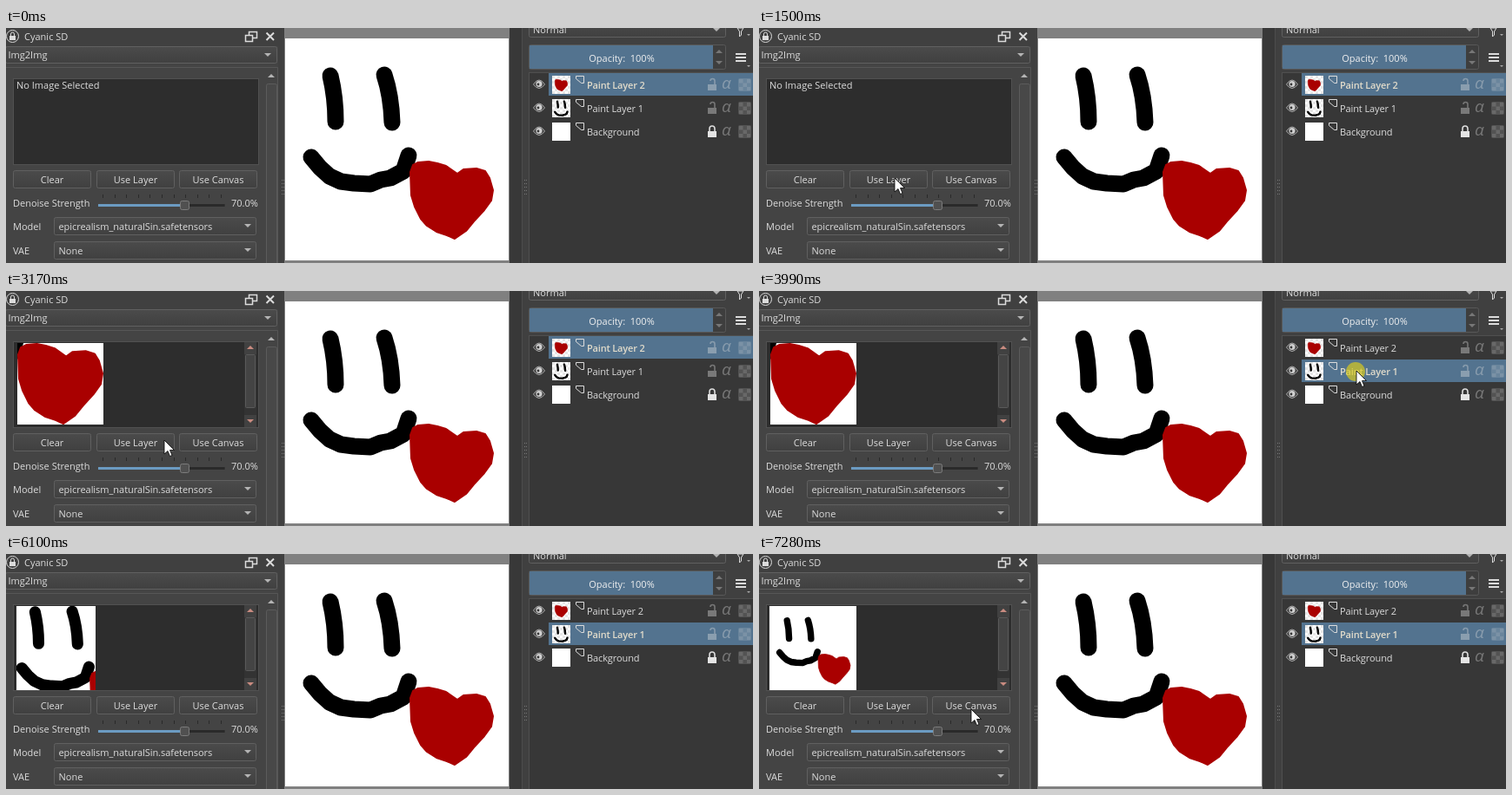
Write an HTML page that moves like this. It is 859 by 271 pixels and loops after 8000 ms.

```html
<!DOCTYPE html>
<html lang="en">
<head>
<meta charset="utf-8">
<title>Image to image dock</title>
<style>
html, body { margin: 0; width: 100%; height: 100%; overflow: hidden; background: #404040; }
svg { display: block; width: 859px; height: 271px; }
text { font: 11px "Open Sans", "Noto Sans", sans-serif; fill: #dcdcdc; white-space: pre; }
.mid { text-anchor: middle; }
.dark { fill: #2d2d2d; }
.btn { fill: url(#face); stroke: #606060; }
.line { fill: none; stroke: #dcdcdc; }
.arrow { fill: #b4b4b4; }
.row rect.bar { fill: none; }
.row .dim { opacity: .38; }
.row .name { letter-spacing: -.1px; }
.row.on rect.bar { fill: #53738f; }
.row.on .name { font-weight: 600; letter-spacing: -.18px; fill: #e2dccb; }
</style>
</head>
<body>
<svg viewBox="0 0 859 271">
  <defs>
    <linearGradient id="face" x2="0" y2="1">
      <stop stop-color="#4b4b4b"/><stop offset="1" stop-color="#404040"/>
    </linearGradient>
    <pattern id="check" width="6" height="6" patternUnits="userSpaceOnUse">
      <rect width="6" height="6" fill="#fff"/><path d="M0 0h3v6h3v-3h-6z" fill="#e6e6e6"/>
    </pattern>
    <clipPath id="view"><rect x="12" y="60" width="260" height="97"/></clipPath>
    <path id="down" d="M-4 -2H4L0 2z"/>
    <path id="up" d="M-4 2H4L0 -2z"/>
    <g id="face-art" fill="none" stroke="#000" stroke-width="19" stroke-linecap="round" stroke-linejoin="round">
      <path d="M373 55Q379 80 379 108M435 54Q443 78 444 109"/>
      <path d="M351 149L361 161 372 171 385 177 400 179 419 180 431 175 442 173 457 165 463 147"/>
    </g>
    <path id="heart" fill="#a90000" stroke="#a90000" stroke-width="2" stroke-linejoin="round" d="M465 166L468 158 474 155 486 154 496 156 506 159 519 168 526 163 541 162 551 165 556 173 560 187 558 199 550 210 538 223 529 234 516 243 507 239 495 235 484 228 477 220 470 206 466 193z"/>
    <g id="art">
      <rect x="321" y="12" width="257" height="256" fill="#fff"/>
      <use href="#face-art"/><use href="#heart"/>
    </g>
    <g id="grip" fill="#777"><path d="M0 0h1v1h-1zm2 0h1v1h-1zM0 4h1v1h-1zm2 0h1v1h-1zM0 8h1v1h-1zm2 0h1v1h-1zM0 12h1v1h-1zm2 0h1v1h-1zM0 16h1v1h-1zm2 0h1v1h-1z"/></g>
  </defs>

  <!-- canvas -->
  <rect x="320" width="259" height="271" fill="#808080"/>
  <use href="#art"/>
  <rect x="579" width="15" height="271" fill="#383838"/>
  <path d="M593.5 0V271" stroke="#4c4c4c"/>
  <use href="#grip" x="317" y="175"/><use href="#grip" x="596" y="175"/>

  <!-- left dock -->
  <rect y="21" width="313" height="250" fill="#444"/>
  <circle cx="7.5" cy="9.5" r="7" class="line"/>
  <rect x="4" y="9" width="7" height="5" fill="#dcdcdc"/>
  <path d="M5.500 9V7a2 2 0 0 1 4 0V9" class="line"/>
  <text x="21" y="14">Cyanic SD</text>
  <path d="M279.500 8V4.500H288.500V11.500H284M275.500 8.500H283.500V15.500H275.500z" class="line" stroke-width="1.500"/>
  <path d="M299.500 5.500L308 14M308 5.500L299.500 14" class="line" stroke-width="2"/>
  <rect x="-.5" y="21.500" width="312" height="19" rx="2" class="btn"/>
  <text x="2.500" y="35">Img2Img</text>
  <use href="#down" x="301" y="31" class="arrow"/>
  <path d="M0 45.500H312.500V271" fill="none" stroke="#565656"/>
  <use href="#up" x="305" y="55" class="arrow"/>
  <rect x="299.500" y="64.500" width="12" height="215" rx="2" fill="#484848" stroke="#5c5c5c"/>

  <rect x="8.500" y="58.500" width="282" height="99" class="dark" stroke="#515151"/>
  <text id="empty" x="12" y="70">No Image Selected</text>
  <g id="loaded">
    <g clip-path="url(#view)" id="shots">
      <g><svg x="13" y="60" width="99" height="94" viewBox="464 153 97 91" preserveAspectRatio="none"><use href="#art"/></svg></g>
      <g><svg x="12" y="60" width="91" height="99" viewBox="342 45 132 144" preserveAspectRatio="none"><use href="#art"/></svg></g>
      <g><svg x="12" y="60" width="100" height="100" viewBox="321 12 257 256" preserveAspectRatio="none"><use href="#art"/></svg></g>
    </g>
    <rect x="274" y="59" width="14" height="98" fill="#414141"/>
    <rect x="274" y="73" width="14" height="70" fill="#333"/>
    <rect x="275.500" y="73.500" width="11" height="61" rx="1" fill="#444" stroke="#5a5a5a"/>
    <g fill="#c98b80"><use href="#up" x="281" y="65"/><use href="#down" x="281" y="150"/></g>
  </g>

  <g id="buttons"></g>
  <text x="8" y="206">Denoise Strength</text>
  <g id="ticks" stroke="#2a2a2a"></g>
  <rect x="106" y="202.500" width="146" height="4" rx="1" fill="#2a2a2a" stroke="#505050" stroke-width=".6"/>
  <rect x="106" y="203" width="95" height="3" fill="#6b9bc2"/>
  <rect x="200.500" y="199.500" width="10" height="10" rx="2" fill="#505050" stroke="#7c7c7c"/>
  <text x="259" y="206">70.0%</text>
  <text x="8" y="233">Model</text>
  <text x="8" y="261">VAE</text>
  <rect x="55.500" y="218.500" width="232" height="20" rx="2" class="btn"/>
  <text x="60.500" y="233" letter-spacing="-.05">epicrealism_naturalSin.safetensors</text>
  <use href="#down" x="278" y="228" class="arrow"/>
  <rect x="55.500" y="246.500" width="232" height="20" rx="2" class="btn"/>
  <text x="60.500" y="261">None</text>
  <use href="#down" x="278" y="256" class="arrow"/>

  <!-- layer dock -->
  <rect x="601.500" y="-9.500" width="226" height="20" rx="2" class="btn"/>
  <text x="606" y="6">Normal</text>
  <use href="#down" x="817" y="2" class="arrow"/>
  <path d="M841 0H848L845.500 4V8L843.500 10V4z" class="line"/>
  <rect x="601.500" y="19.500" width="226" height="28" rx="2" fill="#3e3e3e" stroke="#585858"/>
  <rect x="602" y="20" width="211" height="27" fill="#53738f"/>
  <g fill="#777"><use href="#up" x="820" y="27"/><use href="#down" x="820" y="40"/></g>
  <text x="708" y="39" class="mid" style="fill:#f0f0f0">Opacity:  100%</text>
  <path d="M839 30H851M839 34H851M839 38H851" class="line" stroke-width="2"/>
  <path d="M852 7h4l-2 2zM852 43h4l-2 2z" fill="#aaa"/>
  <rect x="601" y="52" width="258" height="219" fill="#373737"/>
  <path d="M601 51.500H859M601.500 52V271" stroke="#4f4f4f" fill="none"/>
  <g id="layers"></g>

  <circle id="click" cx="-1" cy="1" r="11" fill="#dccc1c" opacity=".68"/>
  <path id="cursor" d="M0 0V16L4 12.500 6.500 18.500 9 17.500 6.500 11.500H11.500z" fill="#fff" stroke="#000" stroke-width=".8"/>
</svg>
<script>
const $ = id => document.getElementById(id);
const show = (el, on) => el.style.display = on ? '' : 'none';

$('buttons').innerHTML = [['Clear', 8], ['Use Layer', 104], ['Use Canvas', 199]].map(([name, x]) =>
  `<rect x="${x + .5}" y="164.5" width="89" height="20" rx="2" class="btn"/>
   <text x="${x + 45}" y="179" class="mid">${name}</text>`).join('');

$('ticks').innerHTML = Array.from({length: 11}, (_, i) =>
  `<path d="M${Math.round(111 + i * 13.6) + .5} 192v4"/>`).join('');

const thumbs = [
  '<rect width="21" height="21" fill="url(#check)"/><use href="#heart" transform="translate(3 4) scale(.155) translate(-464 -153)"/>',
  '<rect width="21" height="21" fill="url(#check)"/><use href="#face-art" transform="translate(2 1.5) scale(.128) translate(-342 -45)"/>',
  '<rect width="21" height="21" fill="#fff"/>'
];
$('layers').innerHTML = ['Paint Layer 2', 'Paint Layer 1', 'Background'].map((name, i) => {
  const locked = i === 2;
  return `<g class="row" transform="translate(0 ${52 + 27 * i})">
    <rect class="bar" x="624" width="235" height="26"/>
    <path d="M606.5 13Q613 3 619.5 13Q613 22 606.5 13z" fill="none" stroke="#b0b0b0"/>
    <circle cx="613" cy="12.5" r="3.6" fill="#d0d0d0"/>
    <circle cx="612" cy="13" r="1.4" fill="#373737"/>
    <g transform="translate(628 3)">${thumbs[i]}</g>
    <path d="M655.5 3.5H664.5V11.500H661.500L655.500 6.500z" class="line"/>
    <text class="name" x="668" y="18">${name}</text>
    <g class="${locked ? '' : 'dim'}">
      <rect x="807" y="13" width="10" height="7" fill="#e4e4e4"/>
      <path d="${locked ? 'M809 13V10a3 3 0 0 1 6 0V13' : 'M815 13V9a2.500 2.500 0 0 0 -5 0'}" class="line" stroke-width="1.6"/>
    </g>
    <g class="dim">
      <text x="823" y="18" style="font-size:19px;font-style:italic">α</text>
      <rect x="842" y="6" width="15" height="15" rx="2" fill="#dcdcdc" opacity=".45"/>
      <path d="M843 7h4.500v4.500h4.500v-4.500h4v4.500h-4v4.500h4v4h-4v-4h-4.500v4h-4.500v-4h4.500v-4.500h-4.500z" fill="#dcdcdc" opacity=".6"/>
    </g>
  </g>`;
}).join('');

// pointer: time, x, y
const path = [
  [600, 386, 250], [1370, 165, 173], [1500, 156, 173], [3169, 156, 173], [3170, 182, 172],
  [3860, 687, 92], [4120, 687, 92], [4740, 150, 170], [4950, 140, 175], [5750, 140, 175],
  [6030, 322, 140], [6450, 428, 132], [6590, 322, 165], [6870, 244, 179], [8000, 244, 179]
];
const clicks = [[1900, 2110], [3990, 4120], [5020, 5220], [7010, 7280]];
const shotTimes = [2040, 5150, 7210];
const STEP = 70;

function pointer(t) {
  const i = path.findIndex(p => p[0] > t);
  if (i < 1) return null;
  const [t0, x0, y0] = path[i - 1], [t1, x1, y1] = path[i];
  const p = Math.floor((t - t0) / STEP) * STEP / (t1 - t0);
  const e = p * p * (3 - 2 * p);
  return [x0 + (x1 - x0) * e, y0 + (y1 - y0) * e];
}

function draw(t) {
  const pos = pointer(t);
  const overCanvas = pos && pos[0] > 320 && pos[0] < 581;
  show($('cursor'), pos && !overCanvas);
  show($('click'), pos && clicks.some(([a, b]) => t >= a && t < b));
  if (pos) {
    const place = `translate(${pos.map(Math.round)})`;
    $('cursor').setAttribute('transform', place);
    $('click').setAttribute('transform', place);
  }
  const shot = shotTimes.filter(s => t >= s).length - 1;
  show($('empty'), shot < 0);
  show($('loaded'), shot >= 0);
  [...$('shots').children].forEach((g, i) => show(g, i === shot));
  const active = t < 3990 ? 0 : 1;
  [...$('layers').children].forEach((g, i) => g.classList.toggle('on', i === active));
}

const start = performance.now();
function tick() {
  draw((performance.now() - start) % 8000);
  requestAnimationFrame(tick);
}
tick();
</script>
</body>
</html>
```
